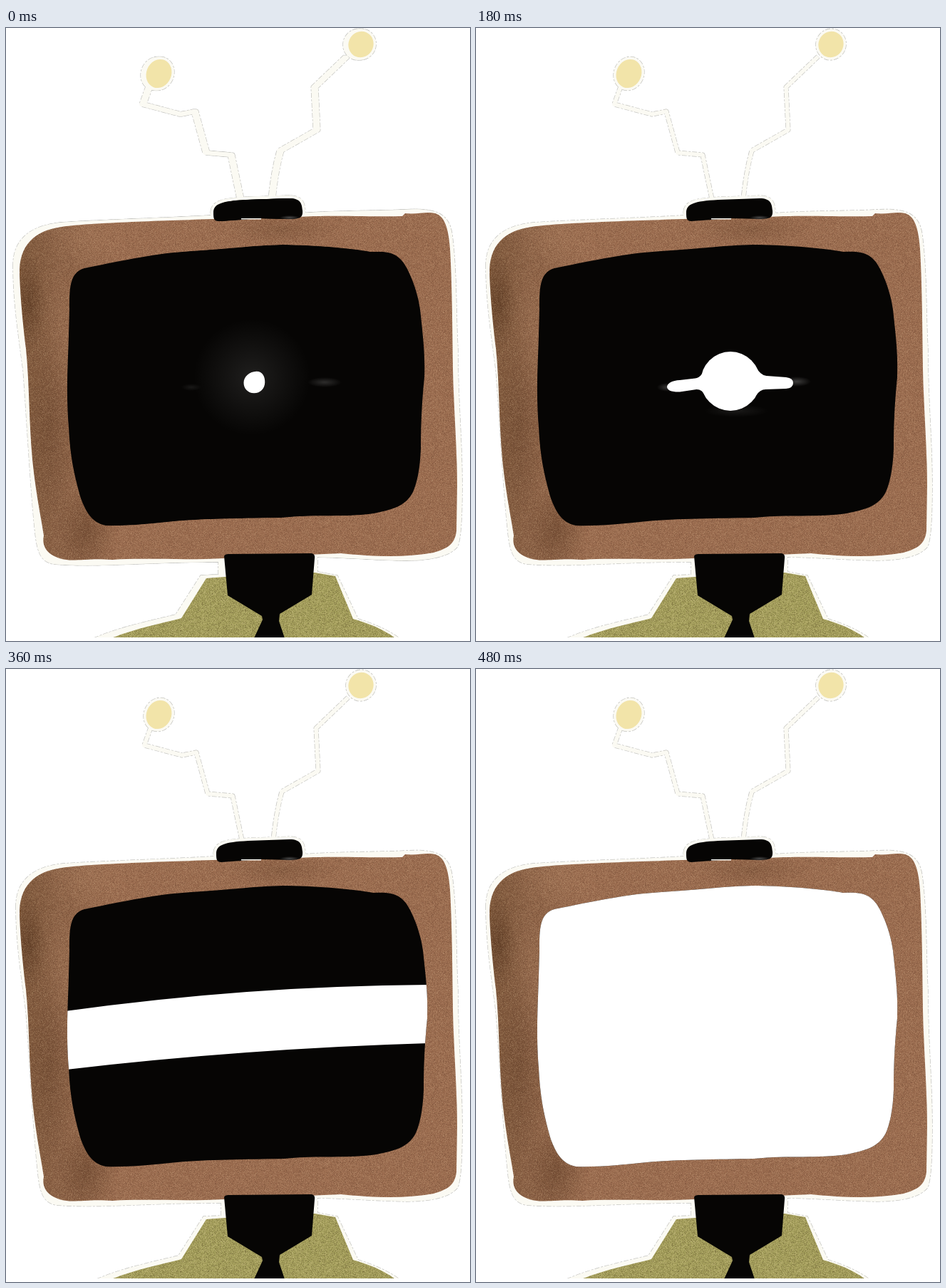
An HTML page with a canvas that plays this animation: 651 px wide and 860 px high, repeating every 0.51 s.

```html
<!DOCTYPE html>
<html lang="en">
<head>
<meta charset="utf-8">
<title>Television head</title>
<style>
html, body { margin: 0; width: 100%; height: 100%; overflow: hidden; background: #fff; }
canvas { display: block; }
</style>
</head>
<body>
<canvas id="stage" width="651" height="860"></canvas>
<script>
const W = 651, H = 860, FLOOR = 855, STEP = 30, STEPS = 17;
const CREAM = '#fbfaf3', EDGE = '#c4c4c0', INK = '#060504';
const ctx = document.getElementById('stage').getContext('2d');

const halo = new Path2D(`M14 335 C13 297 38 277 80 273 C140 269 220 267 290 263 L415 260
  C470 256 520 257 560 255 C603 252 622 260 626 290 C633 345 631 400 634 450
  C634 520 640 580 640 640 C640 690 638 715 634 727 C622 743 590 747 560 747
  C520 746 480 743 437 742 L300 749 C200 749 130 757 70 752 C50 748 47 730 44 700
  C38 640 34 560 28 480 C20 420 14 380 14 335Z`);
const cabinet = new Path2D(`M19 345 C18 305 40 284 78 279 C110 274 200 271 290 268 L410 265
  C450 262 520 265 556 264 L560 260 C575 262 590 257 602 260 C617 264 621 285 623 310
  C627 380 626 460 628 510 C630 560 633 600 633 640 L632 705 C630 727 615 731 600 736
  C560 743 520 742 470 737 L306 744 C250 747 190 743 150 746 C110 743 95 750 75 744
  C58 738 50 728 53 712 C50 690 42 655 37 605 C32 550 33 500 28 450 C22 400 20 370 19 345Z`);
const screen = new Path2D(`M89 395 C89 365 89 343 110 337 C170 325 210 316 260 313
  C320 309 360 304 395 304 C440 305 490 309 515 314 C545 312 557 318 567 338
  C578 360 583 380 585 395 C590 440 592 460 591 490 C587 530 586 560 586 590
  C585 620 580 640 575 651 C565 671 545 676 520 681 C480 687 440 682 390 687
  C340 688 280 688 240 692 C200 696 170 699 140 698 C120 694 112 678 105 660
  C95 625 90 600 88 560 C84 510 87 470 88 430Z`);
const cap = new Path2D(`M295 258 C296 247 305 243 340 241 L398 239 C414 239 415 247 416 256
  C417 268 410 267 400 268 L358 267 L302 271 C295 271 295 266 295 258Z`);
const antennas = new Path2D(`M203 82 L194 107 L247 121 L267 117 L283 175 L318 178 L331 240
  M480 40 L435 83 L438 143 L387 172 Q379 200 375 240`);
const shirtHalo = new Path2D(`M127 856 C165 840 205 832 242 823 L277 768 L302 767 L302 740
  L437 740 L437 763 L465 768 L494 829 C516 836 535 844 552 856Z`);
const shirt = new Path2D(`M148 856 C180 843 215 836 246 828 L281 772 L307 770 L433 764
  L462 769 L487 829 C508 835 531 844 546 856Z`);
const neck = new Path2D(`M306 741 Q307 738 312 738 L429 737 Q434 738 433 744 L429 795
  L384 822 L383 832 L391 856 L348 856 L360 830 L359 825 L311 796Z`);
const blob = new Path2D(`M362 433 C396 432 411 462 410 494 C409 530 385 555 349 555
  C315 555 291 530 291 497 C291 460 326 434 362 433Z`);
const sliver = new Path2D(`M170 501 L198 493 C250 488 285 490 310 490 C390 487 450 485 520 482
  Q555 482 568 487 L550 502 C450 505 300 509 240 511 L190 511Z`);

function ball(x, y, rx, ry, tilt) {
  return grow => {
    const p = new Path2D();
    p.ellipse(x, y, rx + grow, ry + grow, tilt, 0, Math.PI * 2);
    return p;
  };
}
const balls = [ball(214.5, 64, 17.5, 20.5, .4), ball(498, 23, 17.5, 18.5, .4)];

const lerp = (a, b, p) => a + (b - a) * p;

function makeLayer(w, h) {
  const c = document.createElement('canvas');
  c.width = w;
  c.height = h;
  return c;
}

function makeGrain(strength) {
  const tile = makeLayer(256, 256), g = tile.getContext('2d');
  const img = g.createImageData(256, 256);
  let seed = 7;
  const random = () => (seed = (seed * 1664525 + 1013904223) >>> 0) / 4294967296;
  for (let i = 0; i < img.data.length; i += 4) {
    const v = random() + random() - 1;
    const tone = v > 0 ? [255, 232, 190] : [35, 15, 5];
    img.data.set([...tone, Math.abs(v) * strength], i);
  }
  g.putImageData(img, 0, 0);
  return tile;
}

function blotch(g, x, y, rx, ry, rgb, alpha) {
  g.save();
  g.translate(x, y);
  g.scale(rx, ry);
  const fade = g.createRadialGradient(0, 0, 0, 0, 0, 1);
  fade.addColorStop(0, `rgba(${rgb},${alpha})`);
  fade.addColorStop(1, `rgba(${rgb},0)`);
  g.fillStyle = fade;
  g.fillRect(-1, -1, 2, 2);
  g.restore();
}

function eachShift(g, shifts, draw) {
  shifts.forEach(dx => {
    g.save();
    g.translate(dx, 0);
    draw();
    g.restore();
  });
}

function drawHalos(g, shifts) {
  const solids = [halo, shirtHalo, ...balls.map(b => b(3.5))];
  const line = (path, width) => { g.lineWidth = width; g.stroke(path); };
  g.lineJoin = 'round';
  g.strokeStyle = EDGE;
  g.setLineDash([7, 2, 3, 2]);
  eachShift(g, shifts, () => {
    solids.forEach(p => line(p, 1.4));
    line(antennas, 7);
    line(cap, 9);
  });
  g.setLineDash([]);
  g.strokeStyle = g.fillStyle = CREAM;
  eachShift(g, shifts, () => {
    solids.forEach(p => g.fill(p));
    line(antennas, 5.6);
    line(cap, 8);
  });
  g.fillStyle = '#f2e4a9';
  balls.forEach(b => g.fill(b(0)));
}

function drawCabinet(g) {
  g.save();
  g.clip(cabinet);
  const wood = g.createLinearGradient(20, 0, 160, 0);
  wood.addColorStop(0, '#80593c');
  wood.addColorStop(.35, '#8b6145');
  wood.addColorStop(1, '#9b6c4f');
  g.fillStyle = wood;
  g.fillRect(0, 240, W, 520);
  const dark = '65,35,15', light = '200,150,115';
  blotch(g, 32, 385, 26, 70, dark, .4);
  blotch(g, 62, 560, 38, 150, dark, .22);
  blotch(g, 112, 705, 42, 60, dark, .32);
  blotch(g, 385, 282, 85, 24, dark, .22);
  blotch(g, 110, 295, 60, 40, light, .2);
  blotch(g, 80, 430, 26, 110, light, .15);
  g.fillStyle = g.createPattern(makeGrain(52), 'repeat');
  g.fillRect(0, 240, W, 520);
  g.restore();
}

function drawBody(g, shifts) {
  g.fillStyle = '#a49f5b';
  g.fill(shirt);
  g.fillStyle = g.createPattern(makeGrain(75), 'repeat');
  g.fill(shirt);
  g.fillStyle = INK;
  g.fill(neck);
  eachShift(g, shifts, () => g.fill(cap));
  g.fillStyle = CREAM;
  g.fillRect(330, 267, 28, 1.5);
  blotch(g, 398, 266, 14, 3, '90,90,90', .8);
}

function makeFigure(shifts) {
  const layer = makeLayer(W, H), g = layer.getContext('2d');
  g.fillStyle = '#fff';
  g.fillRect(0, 0, W, H);
  g.beginPath();
  g.rect(0, 0, W, FLOOR);
  g.clip();
  drawHalos(g, shifts);
  drawCabinet(g);
  drawBody(g, shifts);
  return layer;
}

const figure = makeFigure([0]);
const wideFigure = makeFigure([-4, -2, 0]);

// Trims the right edge of the screen only.
const trim = new Path2D();
trim.addPath(screen, new DOMMatrix([1, 0, 0, 1, -4, 0]));
trim.rect(80, 300, 20, 400);

const GLOW = '255,255,255';

function ellipse(x, y, rx, ry) {
  ctx.beginPath();
  ctx.ellipse(x, y, rx, ry, 0, 0, Math.PI * 2);
  ctx.fill();
}

function drawDisc(k) {
  const p = k / 3, size = lerp(.25, 1, p);
  if (k === 0) blotch(ctx, 345, 490, 82, 82, GLOW, .1);
  else blotch(ctx, 354, 491, 80 * size, 80 * size, GLOW, .5);
  blotch(ctx, 447, 497, 24, 7, GLOW, .16);
  blotch(ctx, 260, 504, 14, 5, GLOW, .08);
  ctx.save();
  ctx.translate(lerp(348.5, 351, p), lerp(497, 494, p));
  ctx.scale(size, size);
  ctx.translate(-351, -494);
  ctx.fillStyle = '#fff';
  ctx.fill(blob);
  ctx.restore();
}

// A disc with two arms that lengthen while the disc shrinks.
function drawArms(k) {
  const growth = Math.min(1, lerp(.55, 1, (k - 3) / 3));
  const out = Math.max(0, (k - 6) / 4);
  const r = k < 6 ? lerp(60, 41.5, (k - 3) / 3) : lerp(41.5, 11, out);
  const cx = lerp(357, 366, out), cy = 495.5;
  const left = lerp(lerp(cx, 268, growth), 170, out);
  const right = lerp(lerp(cx, 445, growth), 568, out);
  blotch(ctx, right + 5, 496, 20, 7, GLOW, .22);
  blotch(ctx, left, 504, 14, 6, GLOW, .2);
  blotch(ctx, cx + 8, cy + r, 45, 9, GLOW, .08);
  ctx.fillStyle = '#fff';
  ellipse(cx, cy, r, r);
  ctx.beginPath();
  ctx.moveTo(left, 503);
  ctx.quadraticCurveTo(left + 2, 495, left + 18, 494);
  ctx.lineTo(cx - r - 8, 491.5);
  ctx.quadraticCurveTo(cx - r + 2, 490, cx - r * .85, cy - r * .5);
  ctx.lineTo(cx + r * .85, cy - r * .5);
  ctx.quadraticCurveTo(cx + r, 487, cx + r + 9, 488);
  ctx.lineTo(right - 10, 490);
  ctx.quadraticCurveTo(right, 491, right, 498);
  ctx.quadraticCurveTo(right, 505, right - 10, 506);
  ctx.lineTo(cx + r + 8, 507);
  ctx.quadraticCurveTo(cx + r, 507, cx + r * .85, cy + r * .5);
  ctx.lineTo(cx - r * .85, cy + r * .5);
  ctx.quadraticCurveTo(cx - r + 2, 507, cx - r - 6, 507);
  ctx.lineTo(left + 18, 510.5);
  ctx.quadraticCurveTo(left, 511, left, 503);
  ctx.fill();
}

function drawSliver() {
  blotch(ctx, 345, 462, 130, 9, GLOW, .045);
  blotch(ctx, 385, 541, 135, 9, GLOW, .08);
  blotch(ctx, 145, 503, 45, 9, GLOW, .08);
  ctx.save();
  ctx.shadowColor = 'rgba(255,255,255,.3)';
  ctx.shadowBlur = 6;
  ctx.shadowOffsetY = 2;
  ctx.fillStyle = '#fff';
  ctx.fill(sliver);
  ctx.restore();
  ctx.fillStyle = '#fff';
  ellipse(101, 505.5, 1.3, 1.3);
}

// Heights of the band's edges at the left, middle and right of the screen.
const bandKeys = [
  { k: 10, top: [501, 488, 483], bottom: [508, 506, 502] },
  { k: 12, top: [480, 453, 443], bottom: [562, 538, 525] },
  { k: 14, top: [396, 371, 361], bottom: [662, 650, 627] },
  { k: 16, top: [300, 280, 280], bottom: [720, 720, 720] }
];

function drawBand(k) {
  const i = Math.min(2, Math.floor((k - 10) / 2));
  const a = bandKeys[i], b = bandKeys[i + 1], p = (k - a.k) / 2;
  const mix = side => a[side].map((y, n) => lerp(y, b[side][n], p));
  const through = ([l, m, r]) => 2 * m - (l + r) / 2;
  const top = mix('top'), bottom = mix('bottom');
  ctx.fillStyle = '#fff';
  ctx.beginPath();
  ctx.moveTo(84, top[0]);
  ctx.quadraticCurveTo(338, through(top), 593, top[2]);
  ctx.lineTo(593, bottom[2]);
  ctx.quadraticCurveTo(338, through(bottom), 84, bottom[0]);
  ctx.fill();
}

function render(now) {
  const k = Math.floor(now / STEP) % STEPS;
  ctx.drawImage(k === 0 ? wideFigure : figure, 0, 0);
  ctx.save();
  ctx.clip(screen);
  if (k === 0) ctx.clip(trim);
  ctx.fillStyle = INK;
  ctx.fillRect(80, 295, 520, 410);
  if (k <= 3) drawDisc(k);
  else if (k < 10) drawArms(k);
  else if (k === 10) drawSliver();
  else drawBand(k);
  ctx.restore();
}

function tick() {
  render(performance.now());
  requestAnimationFrame(tick);
}
tick();
</script>
</body>
</html>
```
